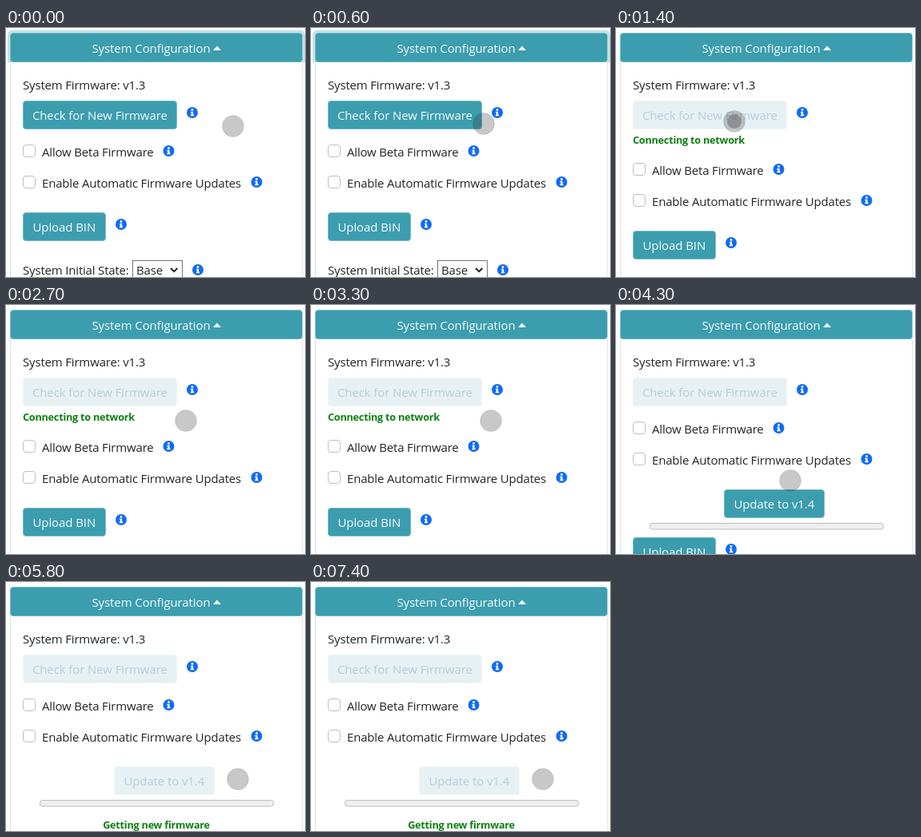
Write an HTML page that moves like this. It is 374x312 px and loops after 8 s.

```html
<!DOCTYPE html>
<html lang="en">
<head>
<meta charset="utf-8">
<title>System Configuration</title>
<style>
  html, body { margin: 0; width: 100%; height: 100%; overflow: hidden; background: #fff; }
  svg { display: block; width: 374px; height: 312px; }
  text { font: 15px "Open Sans", "Noto Sans", sans-serif; fill: #212529; letter-spacing: -.18px; white-space: pre; }
  .mid { text-anchor: middle; letter-spacing: -.1px; }
  .note { font-size: 12.7px; font-weight: 700; fill: #0a800f; letter-spacing: -.25px; }
  .btn rect { fill: #3b9dae; stroke: #74bac6; }
  .btn text { fill: #f6fbfc; }
  .btn.off rect { fill: #e7f1f4; stroke: #edf5f7; }
  .btn.off text { fill: #b8ced5; }
</style>
</head>
<body>
<svg id="stage" viewBox="0 0 374 312"></svg>
<script>
const LOOP = 8000, STEP = 100;
const stage = document.getElementById("stage");

const label = (x, y, s, cls = "") => `<text x="${x}" y="${y}" class="${cls}">${s}</text>`;

const info = (x, y) => `<g transform="translate(${x} ${y})">
  <circle r="7" fill="#116bf3"/><circle cy="-3.5" r="1.4" fill="#fff"/>
  <path d="M-2 -1.2H1.1V2.6H2.1V4.2H-2.1V2.6H-1.1V.4H-2Z" fill="#fff"/></g>`;

const button = (id, x, y, w, h, s, base = 23.7) => `<g id="${id}" class="btn">
  <rect x="${x + .5}" y="${y + .5}" width="${w - 1}" height="${h - 1}" rx="3.5"/>
  ${label(x + w / 2 - .2, y + base, s, "mid")}</g>`;

const checkRow = (y, s, iconX) => `
  <rect x="21.5" y="${y + .5}" width="15" height="15" rx="3.5" fill="#fff" stroke="#bfbfbf"/>
  ${label(45, y + 15, s)}${info(iconX, y + 8)}`;

stage.innerHTML = `
  <path d="M5.5 40V312M371 40V312" stroke="#dfdfdf"/>
  <path id="halo" d="M2 43V9Q2 2.5 8.5 2.5H367.5Q374 2.5 374 9V43Z" fill="#c3e2e8"/>
  ${button("header", 5, 6, 366, 37, "", 25)}
  <g class="btn">${label(181.5, 31, "System Configuration", "mid")}</g>
  <path d="M259 28L264 22.5L269 28Z" fill="#fff"/>
  ${label(21, 77, "System Firmware: v1.3")}
  ${button("check", 21, 91, 193, 36, "Check for New Firmware")}
  ${info(233, 106)}
  <g id="linking">${label(21, 145, "Connecting to network", "note")}</g>
  <g id="options">
    ${checkRow(146, "Allow Beta Firmware", 203.5)}
    ${checkRow(185, "Enable Automatic Firmware Updates", 313.5)}
  </g>
  <g id="update">
    ${button("apply", 135, 231, 126, 36, "Update to v1.4")}
    <rect x="42.5" y="273.5" width="292" height="7.5" rx="3" fill="#efefef" stroke="#bcbcbc"/>
  </g>
  <g id="fetching">${label(188, 309, "Getting new firmware", "mid note")}</g>
  <g id="lower">
    ${button("upload", 21, 231, 104, 36, "Upload BIN")}
    ${info(144, 246)}
    ${label(21, 309, "System Initial State:")}
    <rect x="158.5" y="291.5" width="62" height="24" fill="#fff" stroke="#767676"/>
    ${label(163, 309, "Base")}
    <path d="M206 301L210.2 305.2L214.4 301" fill="none" stroke="#222" stroke-width="2"/>
    ${info(240, 303)}
  </g>
  <g id="pointer">
    <circle r="13.5" fill="#333" fill-opacity=".27" stroke="#333" stroke-opacity=".1"/>
    <circle id="press" r="9" fill="#444" fill-opacity=".36"/>
  </g>`;

const $ = id => document.getElementById(id);
const show = (id, on) => $(id).setAttribute("visibility", on ? "visible" : "hidden");
const move = (id, x, y) => $(id).setAttribute("transform", `translate(${x} ${y})`);
const between = (t, a, b) => t >= a && t < b;

// time, x, y
const route = [
  [100, 284, 123], [1100, 148, 117], [1500, 148, 117], [1900, 225, 145],
  [4200, 225, 145], [4300, 218, 220], [4900, 196, 250], [5400, 196, 250],
  [5800, 290, 247]
];

function pointerAt(t) {
  const i = route.findIndex(p => p[0] > t);
  if (i < 0) return route[route.length - 1].slice(1);
  if (i === 0) return route[0].slice(1);
  const [t0, x0, y0] = route[i - 1], [t1, x1, y1] = route[i];
  const k = (t - t0) / (t1 - t0), e = k * k * (3 - 2 * k);
  return [x0 + (x1 - x0) * e, y0 + (y1 - y0) * e];
}

function draw(t) {
  const linking = between(t, 1300, 3700), ready = t >= 3700, fetching = t >= 5400;
  $("halo").setAttribute("opacity", Math.min(1, Math.max(0, (1400 - t) / 200)));
  $("check").classList.toggle("off", t >= 1300);
  $("apply").classList.toggle("off", fetching);
  show("linking", linking);
  show("update", ready);
  show("fetching", fetching);
  move("options", 0, linking ? 23 : 0);
  move("lower", 0, fetching ? 83 : ready ? 60 : linking ? 23 : 0);
  move("pointer", ...pointerAt(t));
  show("press", between(t, 1200, 1500) || between(t, 5300, 5500));
}

const start = performance.now();
function tick() {
  const t = (performance.now() - start) % LOOP;
  draw(Math.floor(t / STEP) * STEP);
  requestAnimationFrame(tick);
}
draw(0);
requestAnimationFrame(tick);
</script>
</body>
</html>
```
